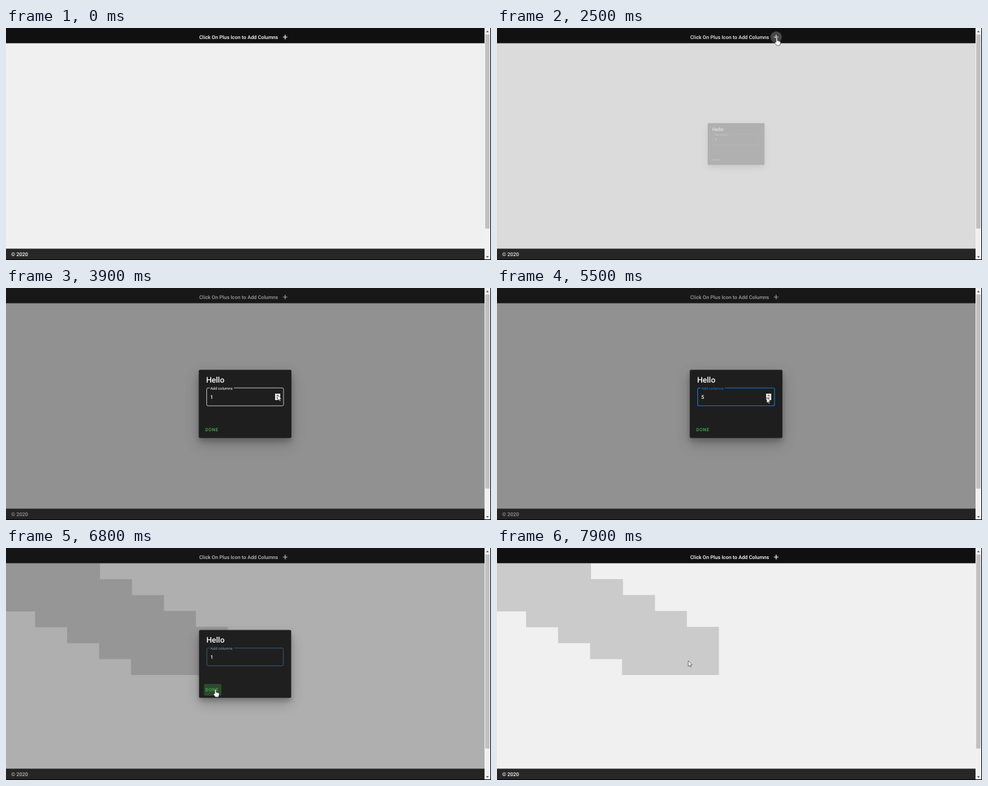
Animation of 748x358 px, one loop 8 s. Source, as an HTML page:

```html
<!DOCTYPE html>
<html lang="en">
<head>
<meta charset="utf-8">
<title>Add columns</title>
<style>
html, body { margin: 0; width: 100%; height: 100%; overflow: hidden; background: #f0f0f0; }
svg { display: block; width: 748px; height: 358px; }
text { font: 500 7.85px Roboto, sans-serif; fill: #fff; text-rendering: geometricPrecision; white-space: pre; }
#dialog { transform-origin: 368.75px 179px; }
#card { filter: drop-shadow(0 5px 4px rgba(0,0,0,.2)) drop-shadow(0 8px 10px rgba(0,0,0,.22)); }
#title { font-size: 12.1px; }
#label { font-size: 5.9px; font-weight: 400; }
#done { font-size: 6.9px; letter-spacing: .62px; fill: #4caf50; }
#cursor path { fill: #fff; stroke: #222; stroke-width: .6; stroke-linejoin: round; }
</style>
</head>
<body>
<svg viewBox="0 0 748 358">
  <rect width="748" height="358" fill="#f0f0f0"/>
  <g id="columns" fill="#cbcbcb"></g>
  <rect width="738" height="23.5" fill="#101010"/>
  <circle id="hover" cx="430.5" cy="14" r="8.7" fill="#fff"/>
  <text x="298" y="17">Click On Plus Icon to Add Columns</text>
  <path d="M427 14h7M430.5 10.5v7" stroke="#fff" stroke-width="1.2"/>
  <rect y="340.5" width="738" height="17.5" fill="#272727"/>
  <text x="8" y="352.2">© 2020</text>
  <rect id="overlay" width="738" height="358" fill="#212121"/>

  <rect x="738" width="10" height="358" fill="#f1f1f1"/>
  <rect x="739" y="10" width="7" height="299.5" fill="#c1c1c1"/>
  <path d="M740.5 6.5h4l-2-2.5zM740.5 352h4l-2 2.5z" fill="#505050"/>
  <path d="M747.5 0v358M0 357.5h748" stroke="#000"/>

  <g id="dialog">
    <rect id="card" x="297.3" y="126.3" width="142.9" height="105.3" rx="2" fill="#1e1e1e"/>
    <text id="title" x="308.7" y="146.2">Hello</text>
    <path id="outline" fill="none" d="M314 154.2H311.5a2 2 0 0 0-2 2V179.8a2 2 0 0 0 2 2H426a2 2 0 0 0 2-2V156.2a2 2 0 0 0-2-2H351.5"/>
    <text id="label" x="315" y="157.2">Add columns</text>
    <text id="value" x="315" y="171"></text>
    <path id="caret" d="M320.5 164v8" stroke="#fff" stroke-width=".6"/>
    <g id="spinner">
      <rect x="415" y="163" width="8" height="10" fill="#e8e8e8"/>
      <path d="M417.3 166.5h3.4l-1.7-2zM417.3 169.5h3.4l-1.7 2z" fill="#444"/>
      <path d="M415 168h8" stroke="#999" stroke-width=".4"/>
    </g>
    <rect id="button" x="305" y="210" width="27" height="18" rx="2" fill="#4caf50"/>
    <text id="done" x="307.2" y="221.4">DONE</text>
  </g>

  <g id="cursor">
    <path id="arrow" d="M0 0V8.6L2 6.8 3.3 9.8 4.6 9.2 3.3 6.3H6Z"/>
    <path id="hand" d="M-1 7V1A1 1 0 0 1 1 1V4.6L4.6 5.6Q6 6 5.8 7.4L5.3 10 4.5 12H0L-2.9 8.2Q-3.2 6.6-1.8 6.7Z"/>
  </g>
</svg>
<script>
const LOOP = 8000;
const $ = id => document.getElementById(id);
const set = (id, attrs) => { for (const k in attrs) $(id).setAttribute(k, attrs[k]); };
const show = (id, on) => set(id, { opacity: +on });
const ramp = (t, start, length) => Math.min(1, Math.max(0, (t - start) / length));
const easeOut = u => 1 - (1 - u) ** 3.5;
const smooth = u => u * u * (3 - 2 * u);
const within = (t, a, b) => t >= a && t < b;
const mix = (a, b, p) => a.map((v, i) => v + (b[i] - v) * p);
const rgb = c => `rgb(${c.map(Math.round)})`;

const IDLE = [84, 84, 84], LABEL = [188, 188, 188], WHITE = [255, 255, 255], BLUE = [25, 118, 210];

// Cursor stops: time, x, y
const stops = [
  [200, 508, 207], [1000, 434, 18], [1250, 434, 18], [1400, 431.5, 15], [2800, 431.5, 15],
  [3450, 424, 228], [3900, 419, 165], [5250, 419, 165], [5500, 416, 169], [6100, 323, 227],
  [6200, 323, 229], [6400, 323, 218], [7050, 323, 218], [7400, 361, 282], [7900, 295, 174], [8000, 295, 174]
];

for (let i = 0; i < 5; i++) {
  const column = document.createElementNS("http://www.w3.org/2000/svg", "rect");
  column.setAttribute("x", -4.4 + 49.3 * i);
  column.setAttribute("y", 23.5 + 24.55 * i);
  column.setAttribute("width", 149.4);
  column.setAttribute("height", 74.3);
  $("columns").append(column);
}

function drawCursor(t) {
  const i = Math.max(1, stops.findIndex(s => s[0] > t));
  const [a, b] = [stops[i - 1], stops[i]];
  const [, x, y] = mix(a, b, smooth(ramp(t, a[0], b[0] - a[0])));
  const hand = within(t, 1000, 2800) || within(t, 6050, 7080);
  // The text beam over the field is invisible
  const hidden = t < 200 || within(t, 3450, 3900) || within(t, 5550, 5850);
  set("cursor", { transform: `translate(${x} ${y})` });
  show("cursor", !hidden);
  show("hand", hand);
  show("arrow", !hand);
}

function drawField(t) {
  const hover = ramp(t, 3200, 150) - ramp(t, 5800, 200);
  const focus = ramp(t, 4180, 250) - ramp(t, 6680, 220);
  set("outline", {
    stroke: rgb(mix(mix(IDLE, WHITE, hover), BLUE, focus)),
    "stroke-width": 0.7 + 0.4 * focus
  });
  $("label").style.fill = rgb(mix(mix(LABEL, WHITE, hover), BLUE, focus));
  $("value").textContent = t < 4200 || t >= 6700 ? 1 : Math.min(5, 2 + Math.floor((t - 4200) / 200));
  show("caret", within(t, 4200, 5300) || within(t, 5800, 6300));
  show("spinner", within(t, 3250, 5600));
}

function draw(t) {
  const opened = easeOut(ramp(t, 2480, 300)) - easeOut(ramp(t, 6800, 300));
  const dimmed = easeOut(ramp(t, 2480, 300)) - easeOut(ramp(t, 6770, 300));
  show("columns", t >= 6700);
  set("overlay", { opacity: 0.46 * dimmed });
  set("hover", {
    opacity: 0.08 * (ramp(t, 1000, 200) - ramp(t, 2700, 250)) + 0.17 * (ramp(t, 2300, 200) - ramp(t, 2650, 300))
  });
  set("dialog", { opacity: opened });
  $("dialog").style.transform = `scale(${0.5 + opened / 2})`;
  set("button", { opacity: 0.1 * ramp(t, 6100, 200) + 0.2 * ramp(t, 6600, 150) });
  drawField(t);
  drawCursor(t);
}

const began = performance.now();
function tick() {
  draw((performance.now() - began) % LOOP);
  requestAnimationFrame(tick);
}
tick();
</script>
</body>
</html>
```
